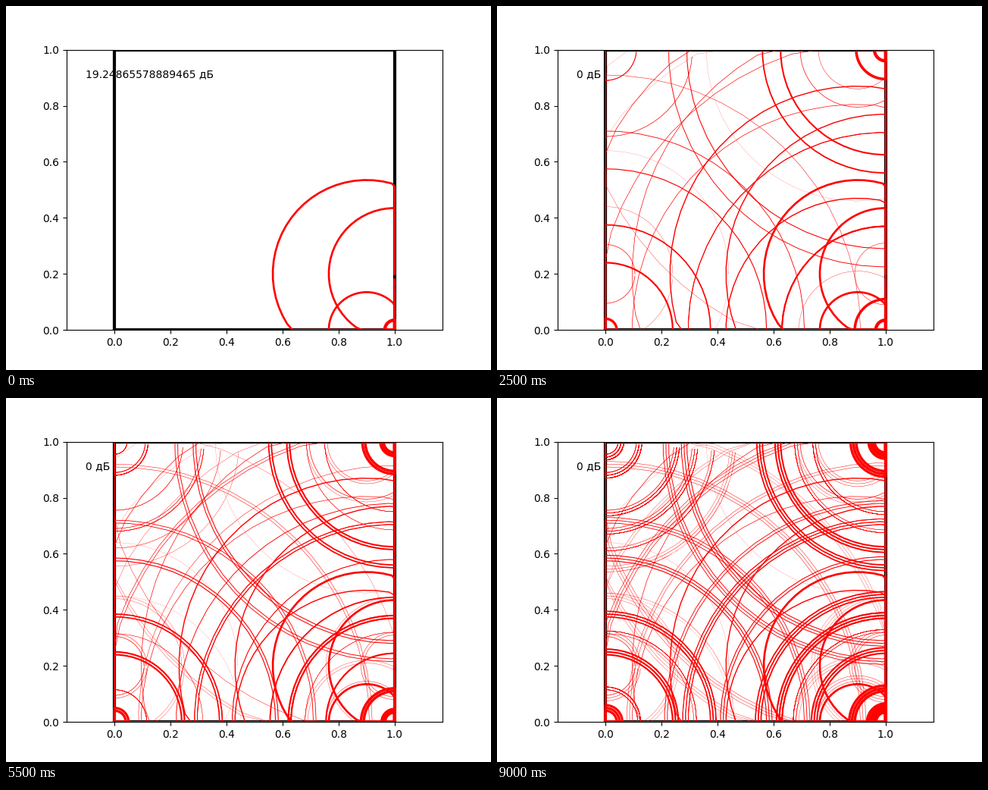
Animation of 640 by 480 pixels, one loop 9.5 s. Source, as a matplotlib script:

```python
import numpy as np
import matplotlib.pyplot as plt
from matplotlib.animation import FuncAnimation

FRAMES = 19
STEP = 0.335            # distance the front travels per frame
SOURCE = (0.9, 0.2)
ANGLES = np.arange(0, 2 * np.pi, 0.1)


def level(r):
    """Sound level in dB at distance r."""
    return max(0, 5 - 30 * np.log10(r))


def reflections(x, y, r):
    """Yield every wave spawned where a front crosses a wall."""
    walls = [(0, y, x), (1, y, 1 - x), (x, 0, y), (x, 1, 1 - y)]
    for wx, wy, dist in walls:
        if 0 < dist < r:
            yield wx, wy, r - dist, level(r)
            yield from reflections(wx, wy, r - dist)


def plot_wave(ax, x, y, r, db):
    xs = np.clip(x + r * np.cos(ANGLES), 0, 1)
    ys = np.clip(y + r * np.sin(ANGLES), 0, 1)
    return ax.plot(xs, ys, color="red", lw=db / 10, visible=False)[0]


fig, ax = plt.subplots(figsize=(6.4, 4.8), dpi=100)
half = 0.5 * 496 / 369.6
ax.set(xlim=(0.5 - half, 0.5 + half), ylim=(0, 1))
ax.set_xticks(np.arange(0, 1.1, 0.2))

for wall in ([0, 0], [0, 1]), ([0, 1], [1, 1]), ([1, 1], [1, 0]), ([1, 0], [0, 0]):
    ax.plot(*wall, color="black", lw=3)

label = ax.text(0.05, 0.9, "", transform=ax.transAxes)

fronts = []
for n in range(FRAMES):
    r = STEP * (n + 1)
    waves = [(*SOURCE, r, level(r)), *reflections(*SOURCE, r)]
    fronts.append([plot_wave(ax, *w) for w in waves if w[3] > 0])


def update(n):
    for k, lines in enumerate(fronts):
        for line in lines:
            line.set_visible(k <= n)
    db = level(STEP * (n + 1))
    label.set_text(f"{db:.14f} дБ" if db else "0 дБ")
    return [label]


anim = FuncAnimation(fig, update, frames=FRAMES, interval=500,
                     repeat=True, repeat_delay=0)
plt.show()
```
